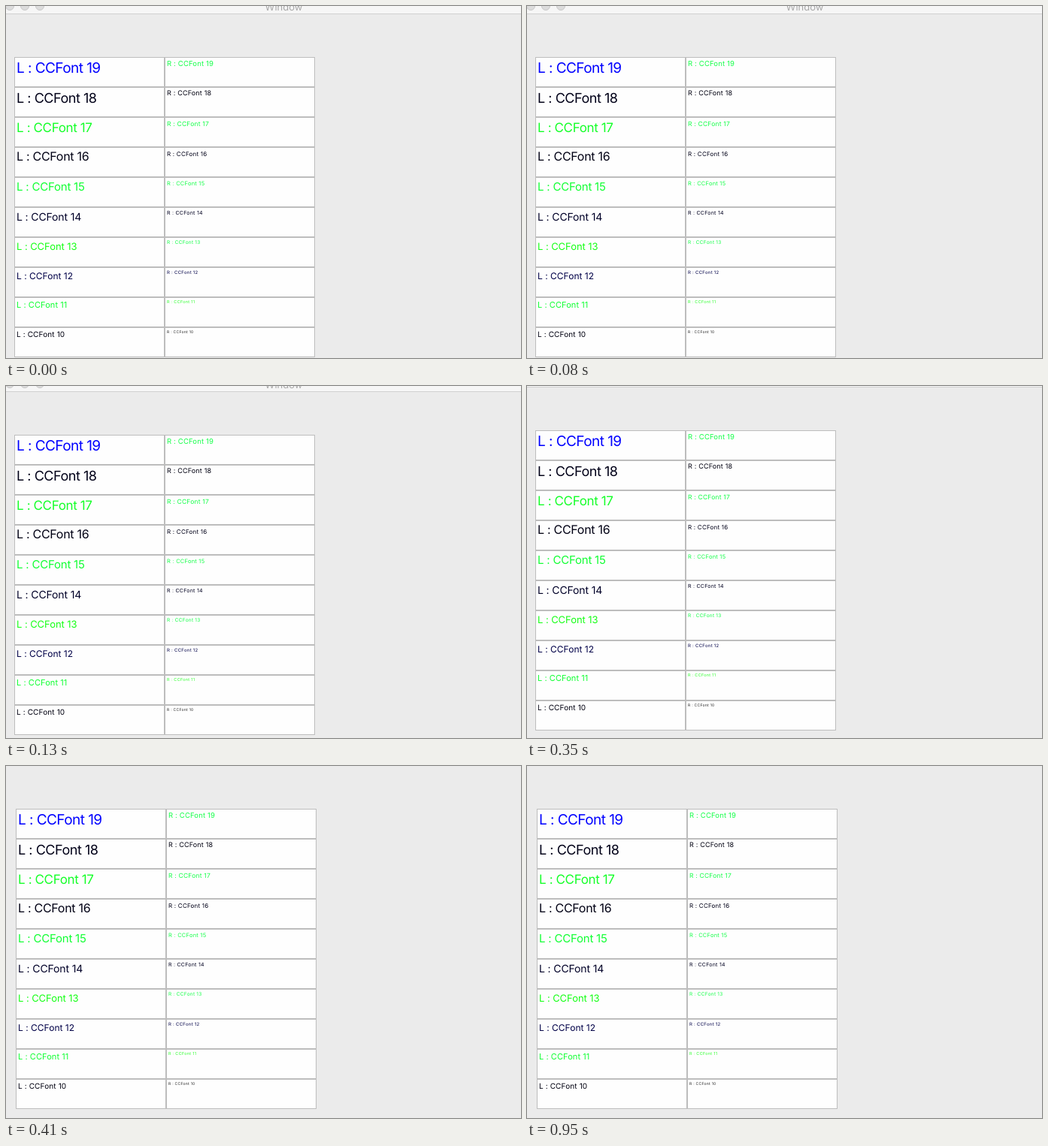
An HTML page that plays this animation: 685 px wide and 469 px high, repeating every 1.31 s.

```html
<!DOCTYPE html>
<html lang="en">
<head>
<meta charset="utf-8">
<title>Font table window</title>
<style>
  html, body { margin: 0; width: 100%; height: 100%; overflow: hidden; background: #ebebeb; }
  svg { display: block; width: 685px; height: 469px; }
  text { font-family: Inter, Roboto, sans-serif; text-rendering: geometricPrecision; }
</style>
</head>
<body>
<svg viewBox="0 0 685 469">
  <g id="win">
    <rect x="-20" y="-30" width="730" height="40" fill="#f6f6f6"/>
    <rect x="-20" y="10" width="730" height="1" fill="#d0d0d0"/>
    <g fill="#dcdcdc" stroke="#c8c8c8">
      <circle cx="5" cy="0" r="5.5"/>
      <circle cx="25" cy="0" r="5.5"/>
      <circle cx="45" cy="0" r="5.5"/>
    </g>
    <text x="369.5" y="5.5" font-size="13" text-anchor="middle" fill="#a8a8a8">Window</text>
  </g>
</svg>
<script>
const win = document.getElementById('win');
const CELL = { w: 200, h: 40, left: 11, top: 68 };

const columns = [
  { name: 'L', scale: 1,
    baselines: [21, 21, 20, 18, 18, 18, 17, 16, 14, 13],
    colors: ['#0000ff', '#000018', '#14ff28', '#000014', '#11ff33',
             '#000028', '#14ff14', '#000048', '#11ff33', '#000010'] },
  { name: 'R', scale: 0.5,
    baselines: [12, 11, 12, 12, 11, 10, 9, 9, 8, 8],
    colors: ['#14ff48', '#000010', '#14ff48', '#000018', '#14ff48',
             '#000020', '#14ff48', '#000048', '#30ff30', '#202020'] },
];

function add(tag, attrs, content = '') {
  const el = document.createElementNS('http://www.w3.org/2000/svg', tag);
  for (const key in attrs) el.setAttribute(key, attrs[key]);
  el.textContent = content;
  win.append(el);
}

// Small type is set looser than large type.
const tracking = size => (0.15 - 0.78 * Math.log(size / 10)) / 12;

columns.forEach((col, c) => {
  for (let row = 0; row < 10; row++) {
    const n = 19 - row, size = n * col.scale;
    const x = CELL.left + c * CELL.w, y = CELL.top + row * CELL.h;
    add('rect', { x: x + 0.5, y: y + 0.5, width: CELL.w - 1, height: CELL.h - 1,
                  fill: '#fefefe', stroke: '#bdbdbd' });
    add('text', { x: x + 3, y: y + col.baselines[row], 'font-size': size,
                  'letter-spacing': (tracking(size) * size).toFixed(3),
                  fill: col.colors[row] }, `${col.name} : CCFont ${n}`);
  }
});

// Start time in ms, then the window's shift in x and y.
const LOOP = 1310;
const steps = [[0, 0, 0], [130, 0, -3], [260, 0, -9], [410, 2, -11], [LOOP, 2, -11]];
win.animate(
  steps.map(([t, x, y]) => ({
    offset: t / LOOP, transform: `translate(${x}px, ${y}px)`, easing: 'step-end',
  })),
  { duration: LOOP, iterations: Infinity });
</script>
</body>
</html>
```
